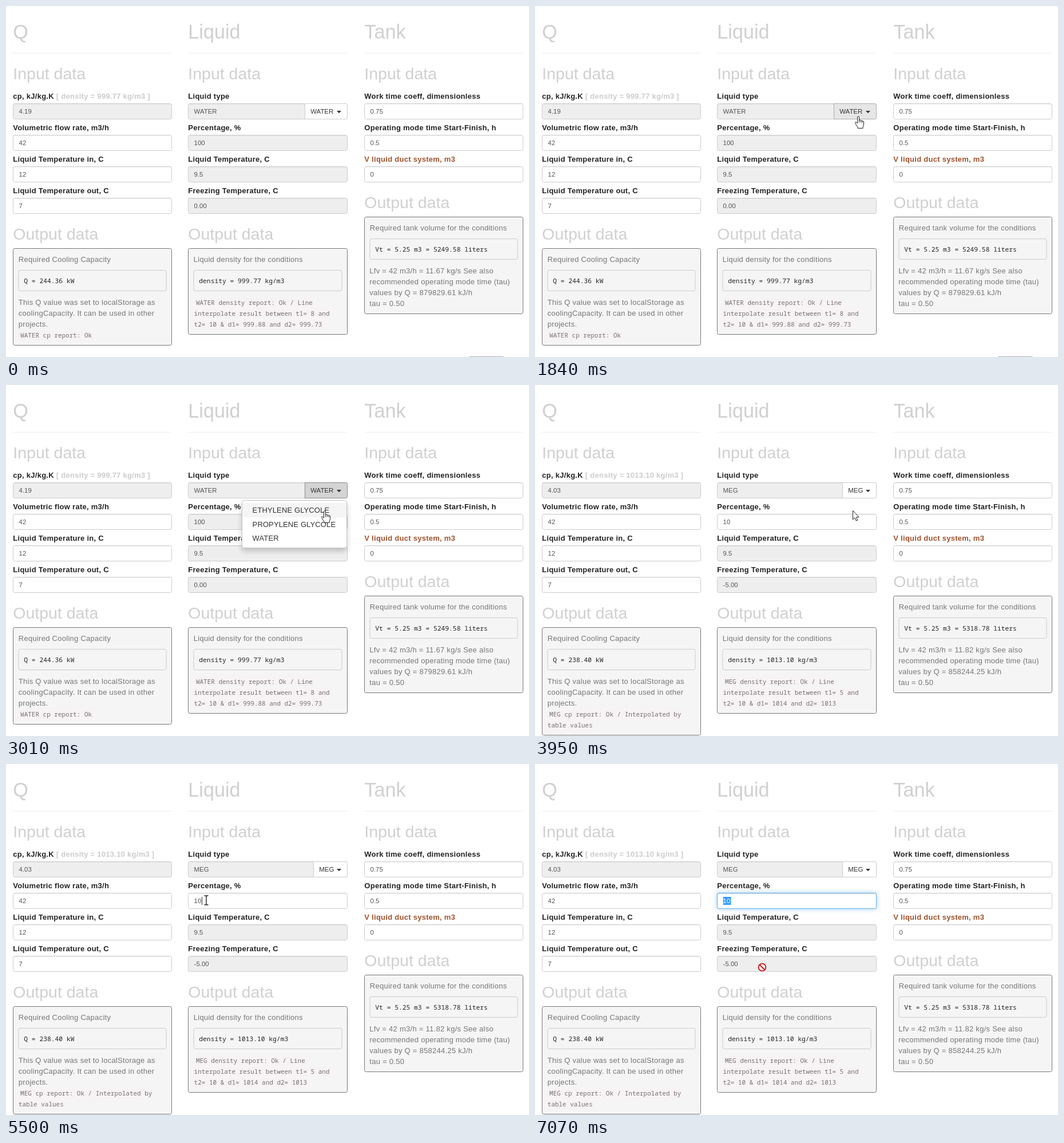
Recreate the animation shown at these times as an HTML page. Size 914x613 px, loop 8000 ms.

```html
<!DOCTYPE html>
<html lang="en">
<head>
<meta charset="utf-8">
<title>Cooling calculator</title>
<style>
html, body { margin: 0; width: 100%; height: 100%; overflow: hidden; background: #fff; }
svg { display: block; }
text { font: 13px "Liberation Sans", Arial, sans-serif; letter-spacing: .27px; fill: #777; }
.h1 { font-size: 34.2px; letter-spacing: 0; fill: #d0d0d0; }
.h3 { font-size: 28.5px; letter-spacing: 0; fill: #d0d0d0; }
.label { font-weight: bold; fill: #222; }
.field { font-size: 11.4px; letter-spacing: 0; fill: #555; }
.dark { fill: #333; }
.item { letter-spacing: .12px; fill: #333; }
.pre { font: 11.3px "Noto Sans Mono", "DejaVu Sans Mono", monospace; letter-spacing: 0; fill: #222; }
.code { font: 10.97px "Noto Sans Mono", "DejaVu Sans Mono", monospace; letter-spacing: 0; fill: #777070; }
#focus {
  position: absolute; left: 318px; top: 225px; width: 279px; height: 28px; box-sizing: border-box;
  border: 1px solid #66afe9; border-radius: 3px;
  box-shadow: inset 0 1px 1px rgba(0,0,0,.075), 0 0 8px rgba(102,175,233,.6);
}
</style>
</head>
<body>
<svg id="stage" width="914" height="613" viewBox="0 0 914 613"></svg>
<div id="focus"></div>
<script>
const LOOP = 8000, PICK = 3950;
const columns = [{ x: 12, w: 277 }, { x: 318, w: 278 }, { x: 626, w: 277 }];

const water = {
  cp: '4.19', density: '999.77', type: 'WATER', split: 522, percent: '100', freeze: '0.00',
  q: '244.36', liters: '5249.58', flow: '11.67', heat: '879829.61', bottom: 593,
  cpReport: ['WATER cp report: Ok'],
  report: ['WATER density report: Ok / Line', 'interpolate result between t1= 8 and', 't2= 10 &amp; d1= 999.88 and d2= 999.73']
};
const glycol = {
  cp: '4.03', density: '1013.10', type: 'MEG', split: 537, percent: '10', freeze: '-5.00',
  q: '238.40', liters: '5318.78', flow: '11.82', heat: '858244.25', bottom: 612,
  cpReport: ['MEG cp report: Ok / Interpolated by', 'table values'],
  report: ['MEG density report: Ok / Line', 'interpolate result between t1= 5 and', 't2= 10 &amp; d1= 1014 and d2= 1013']
};

const text = (x, y, s, cls = '', more = '') => `<text x="${x}" y="${y}" class="${cls}" ${more}>${s}</text>`;
const box = (x, y, w, h, fill, stroke, r = 3, more = '') =>
  `<rect x="${x + .5}" y="${y + .5}" width="${w}" height="${h}" rx="${r}" fill="${fill}" stroke="${stroke}" ${more}/>`;

function field(col, row, label, value, locked) {
  const { x, w } = columns[col], y = 170 + row * 55;
  return text(x + .3, y - 8, label, 'label') +
    box(x, y, w, 27, locked ? '#eee' : '#fff', '#ccc') +
    `<path d="M${x + 2} ${y + 1.5}h${w - 3}" stroke="#000" stroke-opacity=".05"/>` +
    text(x + 10.6, y + 18, value, 'field');
}

function panel(col, top, bottom, title, result) {
  const { x, w } = columns[col];
  return text(x + .3, top - 15, 'Output data', 'h3') +
    box(x, top, w, bottom - top - 1, '#f5f5f5', '#777') +
    text(x + 9.8, top + 24, title) +
    box(x + 9.5, top + 38, w - 19, 36, '#f5f5f5', '#ccc') +
    text(x + 19.3, top + 61, result, 'pre');
}

const lines = (x, y, rows) => rows.map((s, i) => text(x, y + 19 * i, s)).join('');

function report(x, y, rows) {
  return rows.map((s, i) => {
    const left = x + (i ? 0 : 3.3), base = y + 19 * i;
    const len = s.replace('&amp;', '&').length * 6.58;
    return `<rect x="${left - 3}" y="${base - 12}" width="${len + 6}" height="17" rx="3" fill="#f7f3f4"/>` +
      text(left, base, s, 'code');
  }).join('');
}

function selector(d) {
  const s = d.split;
  return `<path class="btn" d="M${s + .5} 170.5H593.5a3 3 0 0 1 3 3V194.5a3 3 0 0 1-3 3H${s + .5}Z" fill="#fff" stroke="#ccc"/>` +
    text(s + 10.3, 188, d.type, 'field dark') + '<path d="M578 183h8l-4 4.2z" fill="#333"/>';
}

function scene(id, d) {
  const heads = ['Q', 'Liquid', 'Tank'].map((s, i) => {
    const { x, w } = columns[i];
    return text(x + .3, 57, s, 'h1') + `<path d="M${x} 82.5h${w + 1}" stroke="#eee"/>` +
      text(x + .3, 128, 'Input data', 'h3');
  }).join('');
  return `<g id="${id}">` + heads +
    field(0, 0, `cp, kJ/kg.K <tspan fill="#ccc">[ density = ${d.density} kg/m3 ]</tspan>`, d.cp, true) +
    field(0, 1, 'Volumetric flow rate, m3/h', '42') +
    field(0, 2, 'Liquid Temperature in, C', '12') +
    field(0, 3, 'Liquid Temperature out, C', '7') +
    field(1, 0, 'Liquid type', d.type, true) + selector(d) +
    field(1, 1, 'Percentage, %', d.percent, d === water) +
    field(1, 2, 'Liquid Temperature, C', '9.5', true) +
    field(1, 3, 'Freezing Temperature, C', d.freeze, true) +
    field(2, 0, 'Work time coeff, dimensionless', '0.75') +
    field(2, 1, 'Operating mode time Start-Finish, h', '0.5') +
    field(2, 2, '<tspan fill="#a0522d">V liquid duct system, m3</tspan>', '0') +
    panel(0, 423, d.bottom, 'Required Cooling Capacity', `Q = ${d.q} kW`) +
    lines(21.8, 522, ['This Q value was set to localStorage as', 'coolingCapacity. It can be used in other', 'projects.']) +
    report(21.8, 579, d.cpReport) +
    panel(1, 423, 574, 'Liquid density for the conditions', `density = ${d.density} kg/m3`) +
    report(328.6, 522, d.report) +
    panel(2, 368, 538, 'Required tank volume for the conditions', `Vt = 5.25 m3 = ${d.liters} liters`) +
    lines(635.3, 467, [`Lfv = 42 m3/h = ${d.flow} kg/s See also`, 'recommended operating mode time (tau)',
      `values by Q = ${d.heat} kJ/h`, 'tau = 0.50']) + '</g>';
}

const menu = '<g id="menu">' +
  box(412, 201, 183, 83, '#fff', '#c4c4c4', 4, 'style="filter:drop-shadow(0 5px 5px rgba(0,0,0,.2))"') +
  '<rect id="row" x="413" y="206" width="182" height="25" fill="#f5f5f5"/>' +
  ['ETHYLENE GLYCOLE', 'PROPYLENE GLYCOLE', 'WATER'].map((s, i) => text(430.6, 223 + 24.6 * i, s, 'item')).join('') + '</g>';

const editing = '<path id="caret" d="M342.5 232v14" stroke="#333"/>' +
  '<g id="selected"><rect x="329" y="232" width="13.5" height="14" fill="#39f"/>' +
  text(328.6, 243, '10', 'field', 'style="fill:#fff"') + '</g>';

const pointers = {
  arrow: '<path d="M.5.5V16L4 12.7 6.3 18.2 8.8 17.2 6.5 11.8H11.2Z" fill="#fff" stroke="#222"/>',
  beam: '<path d="M-3.5-8h2.5L0-7 1-8h2.5M0-7V7M-3.5 8h2.5L0 7 1 8h2.5" fill="none" stroke="#222" stroke-width="1.4"/>',
  hand: '<path d="M-1.5 1.5Q0-.5 1.5 1.5V7.5Q3 6 4.3 8 6 6.8 7 9 9.5 8.3 9.5 11V15Q9.3 17 8 19V21.5H-1V19.5Q-3 17.5-5.3 12.5-5.5 10-3.5 11L-1.5 13Z" fill="#fff" stroke="#222"/>' +
    '<path d="M1.5 7.5V11.5M4.3 8V11.5M7 9V12" stroke="#222"/>',
  ban: '<circle r="7.7" fill="#fff"/><g fill="none" stroke="#c8161d" stroke-width="1.9">' +
    '<circle r="6.4"/><path d="M-4.5-4.5 4.5 4.5"/></g>'
};

// time, x, y, pointer shape
const path = [
  [670, 807, 584, 'arrow'], [750, 782, 540, 'arrow'], [830, 740, 462, 'beam'], [910, 700, 392, 'beam'],
  [990, 668, 338, 'beam'], [1060, 668, 338, 'beam'], [1140, 645, 302, 'beam'], [1220, 620, 275, 'arrow'],
  [1320, 604, 256, 'arrow'], [1400, 594, 243, 'ban'], [1460, 593, 240, 'ban'], [1520, 590, 232, 'ban'],
  [1600, 582, 214, 'arrow'], [1680, 573, 197, 'hand'], [1840, 565, 192, 'hand'], [1930, 565, 192, 'hand'],
  [2070, 564, 185, 'hand'], [2540, 564, 187, 'hand'], [2860, 557, 217, 'hand'], [3010, 557, 219, 'hand'],
  [PICK, 555, 219, 'arrow'], [4420, 555, 219, 'arrow'], [4430, 550, 230, 'beam'], [4750, 440, 240, 'beam'],
  [5050, 356, 239, 'beam'], [5130, 350, 238, 'beam'], [5680, 350, 238, 'beam'], [5780, 350, 262, 'beam'],
  [5860, 351, 287, 'ban'], [5950, 352, 316, 'beam'], [6030, 353, 338, 'ban'], [6140, 354, 358, 'ban'],
  [6200, 355, 359, 'ban'], [6280, 356, 359, 'ban'], [6670, 358, 359, 'ban'], [6840, 366, 358, 'ban'],
  [6990, 376, 357, 'ban'], [7070, 397, 355, 'ban'], [LOOP, 397, 355, 'ban']
];

const stage = document.getElementById('stage');
stage.innerHTML = scene('before', water) + scene('after', glycol) + menu + editing +
  '<path id="dots" d="M810 612.5h59" stroke="#55559a" stroke-dasharray="1 1"/><g id="pointer">' +
  Object.entries(pointers).map(([k, s]) => `<g id="${k}">${s}</g>`).join('') + '</g>';

const $ = id => document.getElementById(id);
const show = (id, on) => { $(id).style.display = on ? '' : 'none'; };
const button = document.querySelector('#before .btn');

function movePointer(t) {
  show('pointer', t >= 670);
  if (t < 670) return;
  const i = path.findIndex(p => p[0] > t), a = path[i - 1], b = path[i];
  const k = a[0] === 3010 ? 0 : (t - a[0]) / (b[0] - a[0]);
  $('pointer').setAttribute('transform', `translate(${a[1] + (b[1] - a[1]) * k} ${a[2] + (b[2] - a[2]) * k})`);
  for (const shape in pointers) show(shape, shape === a[3]);
}

function draw(t) {
  const open = t >= 2240 && t < PICK;
  show('before', t < PICK);
  show('after', t >= PICK);
  show('menu', open);
  show('row', t >= 2700);
  show('dots', t < 2000);
  const hover = t >= 1680;
  button.setAttribute('fill', open ? '#d4d4d4' : hover ? '#e6e6e6' : '#fff');
  button.setAttribute('stroke', open ? '#8c8c8c' : hover ? '#adadad' : '#ccc');
  $('focus').style.opacity = Math.min(1, Math.max(0, (t - 5500) / 150));
  show('caret', t >= 5360 && t < 5580);
  show('selected', t >= 5580);
  movePointer(t);
}

const start = performance.now();
(function tick() {
  draw((performance.now() - start) % LOOP);
  requestAnimationFrame(tick);
})();
</script>
</body>
</html>
```
